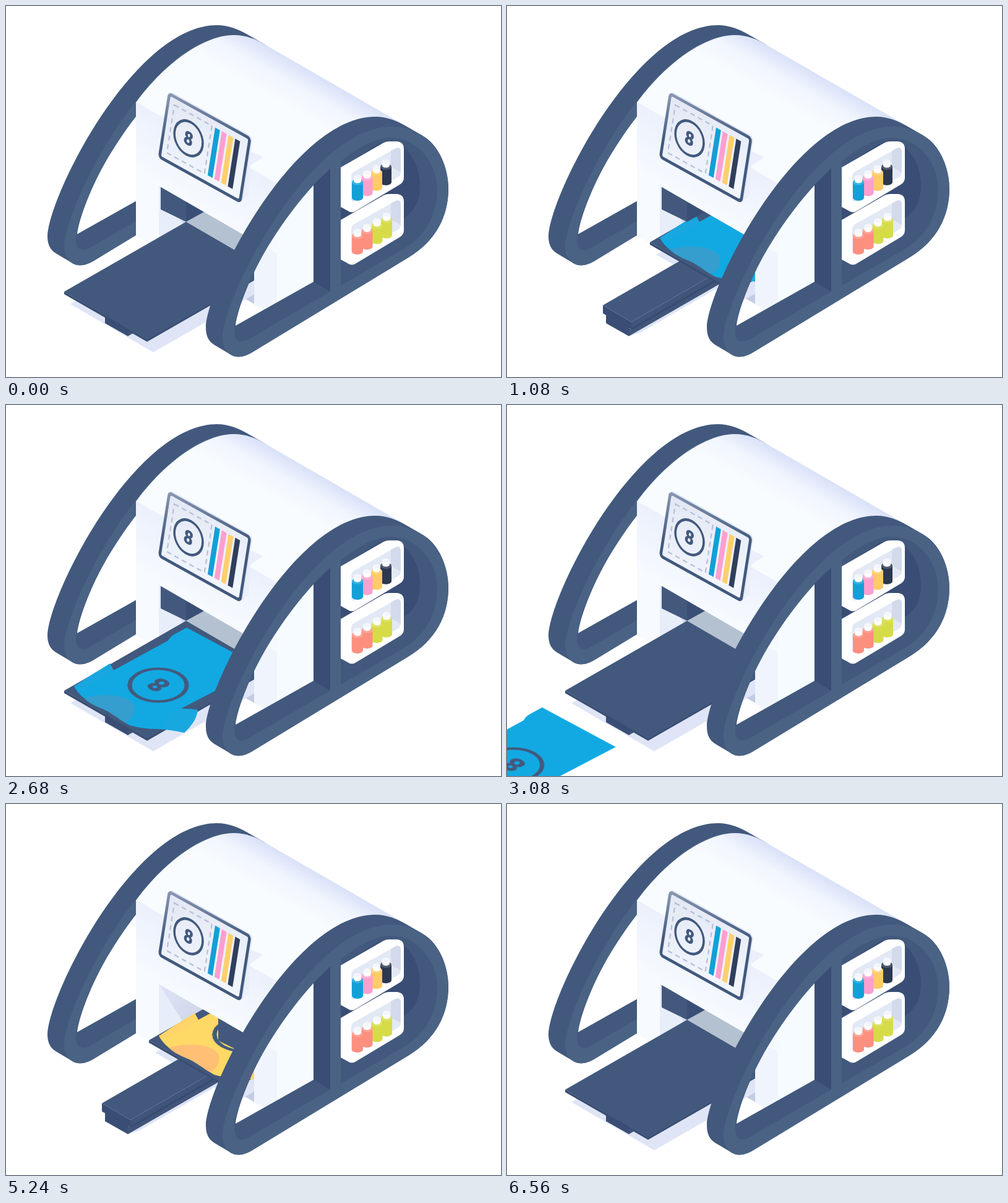
An HTML page for the animation above (6600 ms loop, 800 by 600 pixels).

```html
<!DOCTYPE html>
<html lang="en">
<head>
<meta charset="utf-8">
<title>Shirt printer</title>
<style>
  html, body { margin: 0; width: 100%; height: 100%; overflow: hidden; background: #fff; }
  svg { display: block; width: 800px; height: 600px; }
  .tray, .head, .shirt, .print { animation: 6600ms linear infinite; }
  .tray { animation-name: tray; }
  .head { animation-name: head; }
  .shirt { animation-name: shirt; }
  .print { animation-name: print; }
  .blue { color: #12a9e3; --fold: #3b9dca; }
  .yellow { color: #ffd966; --fold: #ffbd78; }
  .yellow, .yellow .print { animation-delay: -3240ms; }

  /* in at 0.70 s, out at 2.13 s; again 3.36 s later */
  @keyframes tray {
    0%, 10.606%, 36.83%, 61.515%, 87.74%, 100% {
      transform: translate(0, 0);
      animation-timing-function: cubic-bezier(.645, .045, .355, 1);
    }
    16.061%, 32.288%, 66.97%, 83.197% {
      transform: translate(137px, -80px);
      animation-timing-function: cubic-bezier(.215, .61, .355, 1);
    }
  }
  @keyframes head {
    0%, 16.667%, 24.545%, 32.121%, 67.576%, 75.455%, 83.03%, 100% {
      transform: translate(0, 0);
      animation-timing-function: ease-in-out;
    }
    20.606%, 28.485%, 71.515%, 79.394% {
      transform: translate(93px, 53.7px);
      animation-timing-function: ease-in-out;
    }
  }
  @keyframes shirt {
    0%, 51.364%, 100% {
      transform: translate(-620px, 340px);
      animation-timing-function: cubic-bezier(.645, .045, .355, 1);
    }
    9.091%, 42.879% {
      transform: translate(0, 0);
      animation-timing-function: cubic-bezier(.645, .045, .355, 1);
    }
  }
  @keyframes print {
    0%, 18.18%, 51.4%, 100% { opacity: 0; }
    27.27%, 51.3% { opacity: 1; }
  }
</style>
</head>
<body>
<svg viewBox="0 0 800 600" xmlns="http://www.w3.org/2000/svg">
  <defs>
    <linearGradient id="roofFill" gradientUnits="userSpaceOnUse" x1="540" y1="134" x2="506" y2="193">
      <stop offset="0" stop-color="#dae2f8"/>
      <stop offset=".45" stop-color="#f1f5fe"/>
      <stop offset="1" stop-color="#f8fcff"/>
    </linearGradient>
    <linearGradient id="frontFill" gradientUnits="userSpaceOnUse" x1="330" y1="224" x2="280" y2="310">
      <stop offset="0" stop-color="#ebf0fc"/>
      <stop offset="1" stop-color="#f7fbff"/>
    </linearGradient>
    <linearGradient id="wallFill" gradientUnits="userSpaceOnUse" x1="250" y1="300" x2="350" y2="400">
      <stop offset="0" stop-color="#dde3f4"/>
      <stop offset="1" stop-color="#c3cce3"/>
    </linearGradient>
    <linearGradient id="frameFill" x1="0" y1="0" x2=".35" y2=".5">
      <stop offset="0" stop-color="#8c9ab4"/>
      <stop offset="1" stop-color="#42597d"/>
    </linearGradient>
    <linearGradient id="glassFill" x1="0" y1="0" x2=".6" y2="1">
      <stop offset="0" stop-color="#e3e8f4"/>
      <stop offset="1" stop-color="#f1f5fd"/>
    </linearGradient>

    <clipPath id="slot"><path d="M247 291L401 380V482L247 393Z"/></clipPath>
    <clipPath id="reach"><path d="M-600 291H247L401 380V900H-600Z"/></clipPath>

    <g id="arch">
      <path fill="#42597d" fill-rule="evenodd" d="M336.5 548C327 542 323 533 323 520C326 452 464 179 597 179C616 179 632 186 646 194L673 209.500C700 225 715 262 715 295C715 340 695 380 650 407L398 560C384 568 374 570 363.5 564Z
        M371 517C376 475 425 362 497 289V446Z"/>
      <path fill="#4a6384" fill-rule="evenodd" d="M350 536C353 468 491 195 624 195C680 195 715 245 715 295C715 340 695 380 650 407L398 560C370 577 350 562 350 536Z
        M369 525C371 470 440 340 524 263V462L392 539C378 547 369 542 369 525Z
        M541 251C570 228 597 213 622 213C666 213 697 255 697 296C697 335 680 371 643 393L541 452Z"/>
    </g>

    <g id="mark">
      <circle r="26" fill="none" stroke="#42597d" stroke-width="4"/>
      <text y="10.7" text-anchor="middle" font-family="Roboto, Inter, sans-serif" font-weight="900" font-size="30" fill="#42597d">8</text>
    </g>

    <g id="cloth">
      <path fill="currentColor" d="M110 455Q138 436 168 418L174 429L262 381Q266 374 272 371L292 360L411 424L283 491Q298 491 310 493Q308 512 288 530Q265 525 245 524Q220 524 200 518C185 510 170 496 150 489Q134 482 126 474Q116 466 110 455Z"/>
      <path fill="var(--fold)" opacity=".18" d="M110 455Q138 436 168 418L174 429Q150 448 126 458Q116 460 110 455ZM283 491Q298 491 310 493Q308 512 288 530Q265 525 250 524Q262 500 283 491Z"/>
      <path fill="var(--fold)" opacity=".85" d="M126 474C150 466 195 466 206 484C211 497 203 509 193 514C180 507 168 495 150 489Q134 482 126 474Z"/>
    </g>

    <g id="bottle">
      <path fill="currentColor" d="M-9 6V31A9 5 0 0 0 9 31V6A9 5 0 0 0-9 6Z"/>
      <ellipse cy="6" rx="9" ry="5" fill="#fff" opacity=".18"/>
      <path fill="#fff" d="M-6-2V4A6 3.5 0 0 0 6 4V-2A6 3.5 0 0 0-6-2Z"/>
      <ellipse cy="-2" rx="6" ry="3.2" fill="#f3f6fd"/>
    </g>

    <g id="shelf">
      <path fill="#fff" d="M541 261L607 223Q613 219 620 219H632Q643 220 643 231V278Q643 285 636 289L566 331Q559 336 552 331L541 325Z"/>
      <path fill="#e3e8f5" d="M558 276Q558 270 564 267L630 230Q638 227 638 236V269Q638 274 633 277L566 315Q558 319 558 311Z"/>
      <path fill="#d3daec" d="M622 234L630 230Q638 227 638 236V269L622 260Z"/>
    </g>
  </defs>

  <use href="#arch" x="-256" y="-148"/>

  <!-- body -->
  <path fill="url(#roofFill)" d="M210 156C262 85 325 47 368 47C388 47 404 54 417 61.500L673 209.500L560 270L438 287Z"/>
  <path fill="#f6fbff" d="M437 285L500 230V446L437 484Z"/>
  <path fill="url(#frontFill)" d="M210 155L438 287V504L210 372Z"/>
  <path fill="#f0f4fd" d="M401 380L438 400V504L401 482Z"/>

  <!-- inside -->
  <g clip-path="url(#slot)">
    <path fill="url(#wallFill)" d="M247 291L401 380V482L247 393Z"/>
    <path fill="#e8edfa" d="M247 291L287 354L247 380Z"/>
    <path fill="#b4c1d0" d="M291 349L320 332L401 378V414Z"/>
  </g>

  <g clip-path="url(#reach)">
    <path class="tray" fill="#dfe5f6" d="M104 482L301 368L435 447L238 560Z"/>
    <!-- rail -->
    <path fill="#dfe5f6" d="M197 534L214 529L355 448L330 440Z"/>
    <path fill="#42597d" d="M155 484L330 383L376 410L201 511Z"/>
    <path fill="#3a4d75" d="M155 484L201 511V523L197 521V534L160 513V500L155 497Z"/>
    <path fill="#405579" d="M201 511L376 410V431L197 534V521L201 523Z"/>
    <path fill="#364a70" d="M201 521L376 420V423L201 524Z"/>

    <g class="tray">
      <path fill="#394d72" d="M94 462L228 539L425 427V430L228 543L94 466Z"/>
      <path fill="#42597d" d="M94 462L291 349L425 427L228 540Z"/>
      <g class="shirt blue">
        <use href="#cloth"/>
        <g class="print"><use href="#mark" transform="matrix(-1.253 -.72 1.253 -.72 246 453)"/></g>
      </g>
      <g class="shirt yellow">
        <use href="#cloth"/>
        <g class="print"><use href="#mark" transform="matrix(-1.253 -.72 1.253 -.72 246 453)"/></g>
      </g>
    </g>
  </g>

  <g clip-path="url(#slot)">
    <g class="head">
      <path fill="#42597d" d="M250 250L291 272V349L250 329Z"/>
      <path fill="#3a4f76" d="M291 272L320 256V333L291 349Z"/>
    </g>
  </g>

  <!-- control screen -->
  <path fill="#eaeffb" d="M392 234L416 244L395 258L392 308L380 315Z"/>
  <g transform="matrix(.867 .48 -.155 .99 263 140)">
    <rect x="1" y="-3" width="155" height="108" rx="7" fill="#dfe5f4"/>
    <rect x="-1" y="-1" width="155" height="108" rx="7" fill="url(#frameFill)"/>
    <rect x="4" y="4" width="145" height="98" rx="3" fill="url(#glassFill)"/>
    <rect x="13" y="14" width="70" height="78" fill="none" stroke="#b7c0d4" stroke-width="2.4" stroke-dasharray="8 6"/>
    <use href="#mark" x="46.3" y="52.3"/>
    <path fill="#12a0d8" d="M89 14h9v78h-9z"/>
    <path fill="#fd9fd0" d="M101.5 14h9v78h-9z"/>
    <path fill="#ffcf6b" d="M114 14h9v78h-9z"/>
    <path fill="#2f3f5c" d="M126.5 14h9v78h-9z"/>
  </g>

  <!-- near arch with ink shelves -->
  <use href="#arch"/>
  <path fill="#394d75" d="M497 289L524 263V462L497 446Z"/>
  <path fill="#394d75" d="M541 262L600 224C640 205 669 250 669 290C669 315 660 332 643 343L541 402Z"/>
  <use href="#shelf"/>
  <use href="#shelf" y="85"/>
  <use href="#bottle" x="614" y="254" color="#2b3850"/>
  <use href="#bottle" x="599" y="263" color="#ffcb66"/>
  <use href="#bottle" x="583.5" y="271.5" color="#fb9fcf"/>
  <use href="#bottle" x="568" y="279" color="#12a0d8"/>
  <use href="#bottle" x="615" y="340" color="#d6dc48"/>
  <use href="#bottle" x="599.5" y="349" color="#d6dc48"/>
  <use href="#bottle" x="583.5" y="358" color="#fd8f7f"/>
  <use href="#bottle" x="568" y="366" color="#fd8f7f"/>
</svg>
</body>
</html>
```
